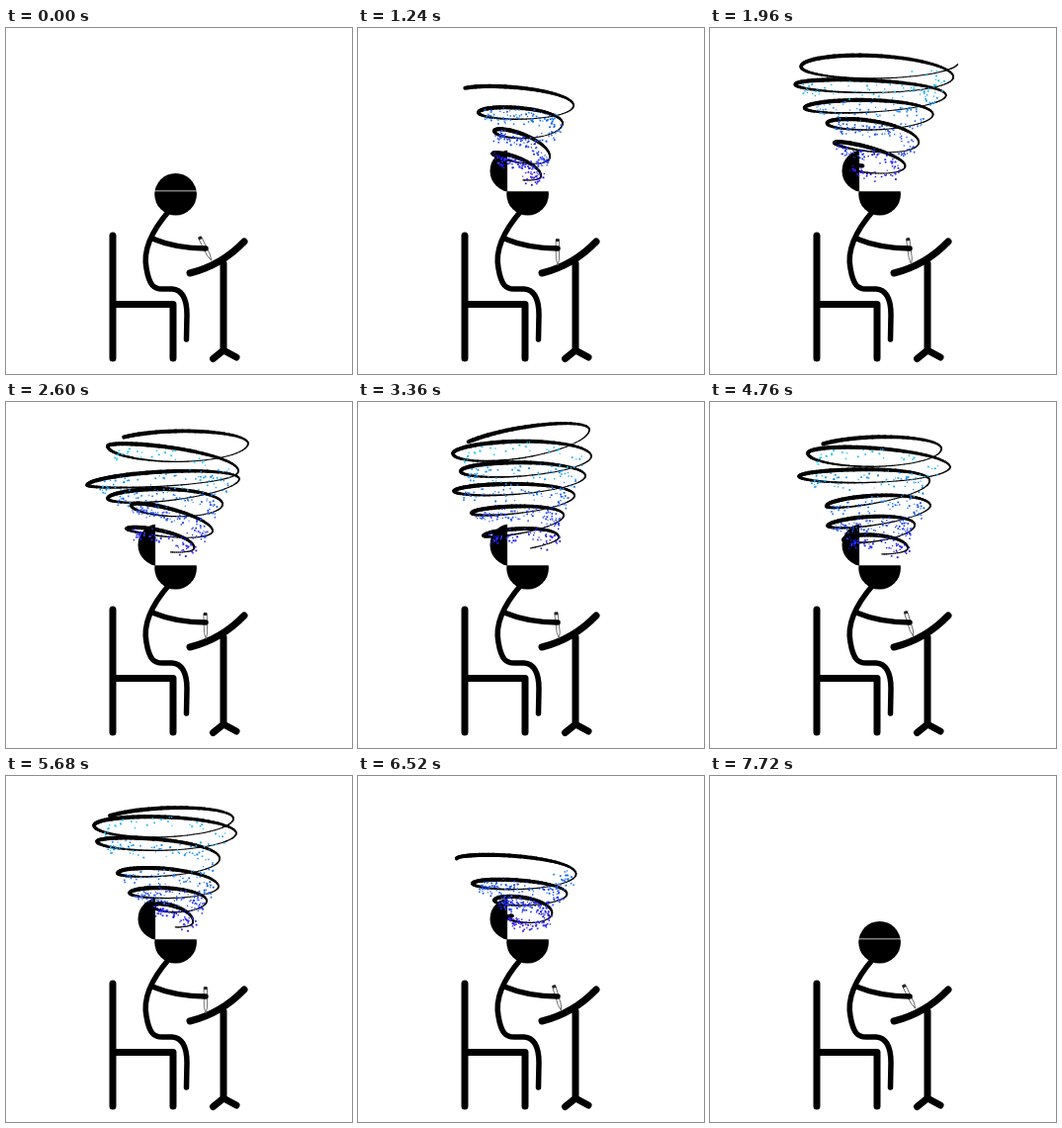
These frames come from a looping animation (350x350 px, 7.76 s). An HTML page with a canvas:

```html
<!DOCTYPE html>
<html lang="en">
<head>
<meta charset="utf-8">
<title>Brainstorm</title>
<style>
html, body { margin: 0; width: 100%; height: 100%; overflow: hidden; background: #fff; }
canvas { display: block; }
</style>
</head>
<body>
<canvas id="stage" width="350" height="350"></canvas>
<script>
const ctx = document.getElementById('stage').getContext('2d');
const LOOP = 7760, STEP = 40, TAU = Math.PI * 2;
const OPEN = 960, GROW = 420, CLOSE = 6760;

// Whirl shapes: one row per turn, bottom first: left x, left y, right x, right y
const shapes = [
  [[153,151,185,150], [136,127,194,131], [138,104,207,97], [122,85,218,79], [100,64,234,60], [98,46,240,42]],
  [[150,148,190,148], [122,128,209,131], [127,104,219,104], [103,97,236,78], [82,84,235,70], [103,45,245,42]],
  [[152,150,203,137], [127,135,208,115], [115,112,219,95], [97,90,230,75], [104,70,236,55], [96,52,234,28]],
  [[152,150,200,148], [135,139,207,125], [119,125,223,105], [118,105,222,80], [90,75,243,66], [99,52,234,47]],
  [[155,150,189,148], [150,131,203,127], [125,118,215,112], [113,98,216,84], [92,66,233,58], [89,50,230,43]]
];

// Key moments: time, shape, pen angle in degrees, spins until the next key
const keys = [
  [0, 0, 26, 3], [1240, 0, 0, 3], [2600, 1, 1, 2], [3360, 2, 6, 3],
  [4760, 3, 17, 2], [5680, 4, 0, 4], [7720, 4, 26, 0]
];

const clamp = (v, lo, hi) => Math.min(hi, Math.max(lo, v));
const mix = (a, b, k) => a + (b - a) * k;

function seeded(seed) {
  return () => (seed = (seed * 16807) % 2147483647) / 2147483647;
}

const rnd = seeded(4711);
const specks = Array.from({ length: 340 }, () => ({
  q: 0.15 + 4.75 * rnd(),
  dx: (rnd() + rnd() - 1) * 7,
  dy: (rnd() + rnd() - 1) * 7,
  size: 1.1 + rnd() * 0.8,
  light: 45 + rnd() * 18
}));

function poseAt(t) {
  let i = 0;
  while (i < keys.length - 2 && t >= keys[i + 1][0]) i++;
  const a = keys[i], b = keys[i + 1];
  const k = clamp((t - a[0]) / (b[0] - a[0]), 0, 1);
  const spin = TAU * a[3] * k;
  const swing = Math.sin(spin / 2) ** 2;
  const rows = shapes[a[1]].map((row, r) =>
    row.map((v, c) => mix(v, shapes[b[1]][r][c], k)));
  return { rows, spin, swing, pen: mix(a[2], b[2], k) + 7 * swing };
}

function rowValue(rows, q, col) {
  q = clamp(q, 0, rows.length - 1);
  const i = Math.min(Math.floor(q), rows.length - 2);
  return mix(rows[i][col], rows[i + 1][col], q - i);
}

// Point on the whirl, q turns above its lower end
function whirlPoint(pose, q, size = 1, shift = 0) {
  const { rows, swing } = pose;
  const xl = rowValue(rows, q, 0), yl = rowValue(rows, q, 1);
  const xr = rowValue(rows, q - 0.5, 2), yr = rowValue(rows, q - 0.5, 3);
  const angle = Math.PI - TAU * q - pose.spin - shift;
  const c = Math.cos(angle) * size / 2;
  const wide = 1 + 0.13 * swing;
  return {
    angle,
    x: (xl + xr) / 2 + (xr - xl) * wide * c,
    y: (yl + yr) / 2 + (yr - yl) * c + (6 + 1.4 * q) * size * Math.sin(angle) - 1.3 * swing * q
  };
}

function drawWhirl(pose, grown) {
  const end = 5.9 * grown;
  let prev = whirlPoint(pose, 0.25);
  for (let q = 0.265; q <= end; q += 0.015) {
    const p = whirlPoint(pose, q);
    ctx.lineWidth = 1 + 1.6 * (1 + Math.cos(p.angle + 2.2));
    ctx.beginPath();
    ctx.moveTo(prev.x, prev.y);
    ctx.lineTo(p.x, p.y);
    ctx.stroke();
    prev = p;
  }
  for (const s of specks) {
    const q = s.q * grown;
    const p = whirlPoint(pose, q, 0.84, 1);
    ctx.fillStyle = `hsl(${250 - 12 * q} 90% ${s.light}%)`;
    ctx.fillRect(p.x + s.dx, p.y + s.dy, s.size, s.size);
  }
}

function line(width, path) {
  ctx.lineWidth = width;
  ctx.stroke(new Path2D(path));
}

function drawPen(angle) {
  ctx.save();
  ctx.translate(202, 223.5 + (26 - angle) * 0.14);
  ctx.rotate(-angle * Math.PI / 180);
  ctx.fillStyle = '#fff';
  ctx.strokeStyle = '#555';
  ctx.lineWidth = 0.8;
  const body = new Path2D('M-1.5-13H1.5V7L0 13L-1.5 7Z');
  ctx.fill(body);
  ctx.stroke(body);
  ctx.fillStyle = '#222';
  ctx.fillRect(-1.9, -14, 3.4, 3);
  ctx.restore();
}

function headPart(top, height, turn) {
  ctx.save();
  ctx.translate(151.3, 164.8);
  ctx.rotate(-turn * Math.PI / 180);
  ctx.beginPath();
  ctx.rect(-30, top, 100, height);
  ctx.clip();
  ctx.beginPath();
  ctx.arc(20.3, 3.5, 21.3, 0, TAU);
  ctx.fillStyle = '#000';
  ctx.fill();
  ctx.restore();
}

function draw(t) {
  const pose = poseAt(t);
  const lid = 90 * clamp(Math.min(t, 7720 - t) / OPEN, 0, 1);
  const grown = clamp(Math.min(t - OPEN, CLOSE - t) / GROW, 0, 1);

  ctx.fillStyle = '#fff';
  ctx.fillRect(0, 0, 350, 350);
  ctx.strokeStyle = '#000';
  ctx.lineCap = ctx.lineJoin = 'round';

  line(7, 'M108 210V334M108 279.5H169V334');
  line(7, 'M186 248Q218 240 241 216M220 238V326L209.5 334.5M220 326L233 333');
  drawPen(pose.pen);
  line(5.5, 'M165 185C144 209 139 228 142 243C145 261 150 264 158 264H168C180 265 183 277 183 290L182.5 315');
  line(5.5, 'M148 213Q172 223 202 223');

  headPart(0.4, 40, 0);
  headPart(-40, 39.8, lid);
  if (grown > 0) drawWhirl(pose, grown);
}

function tick() {
  const t = performance.now() % LOOP;
  draw(Math.floor(t / STEP) * STEP);
  requestAnimationFrame(tick);
}
tick();
</script>
</body>
</html>
```
